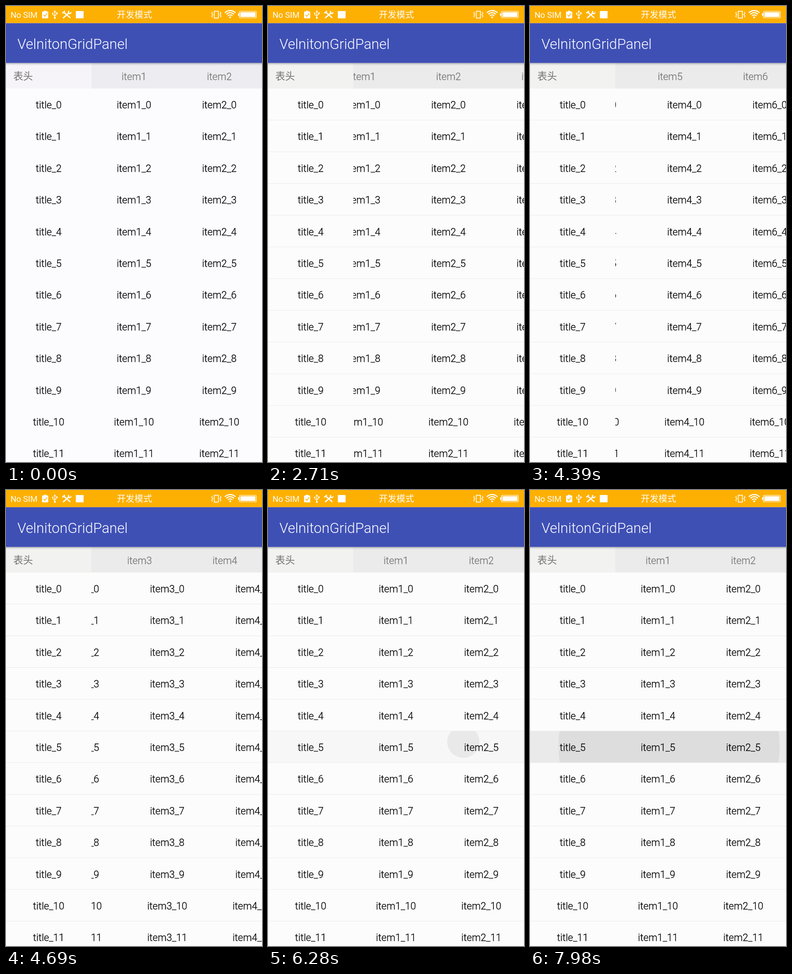
Animation of 561x998 px, one loop 8 s. Source, as an HTML page with a canvas:

```html
<!DOCTYPE html>
<html lang="zh-CN">
<head>
<meta charset="utf-8">
<title>Scrolling table</title>
<style>
html, body { margin: 0; width: 100%; height: 100%; overflow: hidden; background: #fcfcfc; }
canvas { display: block; width: 561px; height: 998px; }
</style>
</head>
<body>
<canvas id="stage"></canvas>
<script>
const W = 561, H = 998, LOOP = 8000;
const COL = 187, ROW = 69.4, TOP = 180.6;
const BAR_TOP = 37.4, BAR_END = 124.6;
const MAX_SCROLL = COL * 4;
const HEADS = ['item1', 'item2', 'item3', 'item4', 'item5', 'item6'];
const CELLS = ['item1', 'item2', 'item3', 'item4', 'item4', 'item6'];
const LATIN = 'Roboto, "Noto Sans", sans-serif';
const CJK = '"Noto Sans CJK SC", "Noto Sans CJK", sans-serif';
const CELL_FONT = '300 21.7px ' + LATIN;
const AMBER = '#fdb002';

const canvas = document.getElementById('stage');
const dpr = window.devicePixelRatio || 1;
canvas.width = Math.round(W * dpr);
canvas.height = Math.round(H * dpr);
const ctx = canvas.getContext('2d');
ctx.scale(dpr, dpr);

const clamp = v => Math.max(0, Math.min(1, v));
const span = (t, from, to) => clamp((t - from) / (to - from));
const lerp = (a, b, k) => a + (b - a) * k;

function box(x, y, w, h, fill) {
  ctx.fillStyle = fill;
  ctx.fillRect(x, y, w, h);
}

function text(str, x, y, font, fill, align = 'center') {
  ctx.font = font;
  ctx.fillStyle = fill;
  ctx.textAlign = align;
  ctx.fillText(str, x, y);
}

// Table text, a touch heavier than the light weight.
function cell(str, x, y, fill) {
  text(str, x, y, CELL_FONT, fill);
  ctx.lineWidth = 0.3;
  ctx.strokeStyle = fill;
  ctx.strokeText(str, x, y);
}

function line(points, width, color = '#fff') {
  ctx.beginPath();
  points.forEach(([x, y]) => ctx.lineTo(x, y));
  ctx.lineWidth = width;
  ctx.strokeStyle = color;
  ctx.stroke();
}

function disc(x, y, r, fill) {
  ctx.beginPath();
  ctx.arc(x, y, r, 0, Math.PI * 2);
  ctx.fillStyle = fill;
  ctx.fill();
}

function rounded(x, y, w, h, r, fill) {
  ctx.beginPath();
  ctx.roundRect(x, y, w, h, r);
  ctx.fillStyle = fill;
  ctx.fill();
}

function clipped(x, y, w, h, draw) {
  ctx.save();
  ctx.beginPath();
  ctx.rect(x, y, w, h);
  ctx.clip();
  draw();
  ctx.restore();
}

// Drag, short stall, then a fling to the far end.
function scrollOut(t) {
  if (t < 2810) return 72 * Math.pow(span(t, 2480, 2710), 1.6);
  return lerp(170, MAX_SCROLL, 1 - Math.pow(1 - span(t, 2790, 3250), 2));
}

function scrollBack(t) {
  const k = Math.pow(span(t, 4270, 5030), 0.962);
  return MAX_SCROLL * (1 - k * k * (3 - 2 * k));
}

// The header trails the rows on the way back.
function scrollAt(t, lag) {
  if (t < 2500) return 0;
  if (t < 4270) return scrollOut(t);
  const held = t > 4690 && t < 4790 ? 4690 : t;
  return scrollBack(held - lag);
}

function statusBar() {
  box(0, 0, W, BAR_TOP, AMBER);
  text('No SIM', 10, 25.5, '400 18px ' + LATIN, '#fff', 'left');
  text('开发模式', 281.5, 25.5, '500 19.3px ' + CJK, '#fff');

  // clipboard
  rounded(79, 12, 13.5, 15, 1.5, '#fff');
  rounded(83, 10.5, 5.5, 3, 1, '#fff');
  line([[82, 19.5], [85, 22.5], [90, 16.5]], 1.6, AMBER);

  // cable
  line([[107, 12], [107, 25]], 1.5);
  line([[102.5, 16], [102.5, 19], [107, 22.5]], 1.3);
  line([[111.5, 15], [111.5, 18], [107, 21]], 1.3);
  line([[105, 13.5], [107, 10.5], [109, 13.5]], 1.3);
  disc(107, 26, 2, '#fff');
  disc(102.5, 16, 1.6, '#fff');
  box(110, 14, 3, 3, '#fff');

  // tools
  line([[126, 13], [141, 26]], 2.6);
  line([[139, 14], [125, 26.5]], 2.8);
  line([[123.5, 16], [129, 11]], 3);
  ctx.beginPath();
  ctx.arc(139.5, 14, 3, -0.2, 4.3);
  ctx.lineWidth = 2;
  ctx.stroke();

  box(153, 11, 17, 16, '#fff');

  // vibrate
  ctx.lineWidth = 1.7;
  ctx.strokeRect(456.5, 11.5, 9, 15);
  for (const [x, d] of [[452.5, -1], [469.5, 1]]) {
    line([[x, 13], [x + d * 1.7, 16], [x - d, 19], [x + d * 1.7, 22], [x, 25]], 1.5);
  }

  // signal
  for (const r of [16, 11.3, 6.7]) {
    ctx.beginPath();
    ctx.arc(491.3, 26, r, -Math.PI * 0.76, -Math.PI * 0.24);
    ctx.lineWidth = 2.3;
    ctx.stroke();
  }
  disc(491.3, 24.8, 2.1, '#fff');

  // battery
  ctx.beginPath();
  ctx.roundRect(511.5, 11.5, 37, 14.5, 2);
  ctx.lineWidth = 1.2;
  ctx.stroke();
  box(508.5, 16, 2.5, 5.5, '#fff');
  box(513.5, 13.5, 33, 10.5, '#fff');
}

function toolbar() {
  box(0, BAR_TOP, W, BAR_END - BAR_TOP, '#3f50b5');
  text('VelnitonGridPanel', 25, 94, '300 31.1px ' + LATIN, '#fff', 'left');
}

function header(scroll, early) {
  const h = TOP - BAR_END;
  box(0, BAR_END, COL, h, early ? '#f6f4f8' : '#f2f2f0');
  box(COL, BAR_END, W - COL, h, early ? '#edecf0' : '#ebebeb');
  const shade = ctx.createLinearGradient(0, BAR_END, 0, BAR_END + 6);
  shade.addColorStop(0, 'rgba(0,0,0,.3)');
  shade.addColorStop(0.4, 'rgba(0,0,0,.1)');
  shade.addColorStop(1, 'rgba(0,0,0,0)');
  box(0, BAR_END, W, 6, shade);
  text('表头', 16, 161, '300 21.6px ' + CJK, '#707070', 'left');
  clipped(COL, BAR_END, W - COL, h, () => {
    HEADS.forEach((name, i) => cell(name, COL * (i + 1.5) - scroll, 162, '#757575'));
  });
}

// Long press on one row: the wave grows and drifts to the row centre.
function ripple(t) {
  if (t < 5992) return;
  const y = TOP + ROW * 5, midY = y + ROW / 2;
  const k = span(t, 5992, 8315);
  clipped(0, y, W, ROW, () => {
    box(0, y, W, ROW, `rgba(0,0,0,${0.072 * span(t, 5992, 7090)})`);
    disc(lerp(449, W / 2, k), lerp(549.5, midY, k), 283 * k,
      `rgba(0,0,0,${0.055 * span(t, 5992, 6200)})`);
  });
}

function rows(scroll, early) {
  const baseline = r => TOP + ROW * r + 43.4;
  for (let r = 0; r < 12; r++) {
    if (!early) box(0, TOP + ROW * (r + 1) - 0.8, W, 1, '#ebebee');
    cell('title_' + r, COL / 2, baseline(r), '#000');
  }
  clipped(COL, TOP, W - COL, H - TOP, () => {
    for (let r = 0; r < 12; r++) {
      CELLS.forEach((name, i) =>
        cell(name + '_' + r, COL * (i + 1.5) - scroll, baseline(r), '#000'));
    }
  });
}

function draw(t) {
  const early = t < 2500;
  box(0, 0, W, H, early ? '#fcfbfe' : '#fcfcfc');
  ripple(t);
  rows(scrollAt(t, 0), early);
  header(scrollAt(t, 42), early);
  toolbar();
  statusBar();
}

const start = performance.now();
function tick() {
  draw((performance.now() - start) % LOOP);
  requestAnimationFrame(tick);
}
tick();
</script>
</body>
</html>
```
